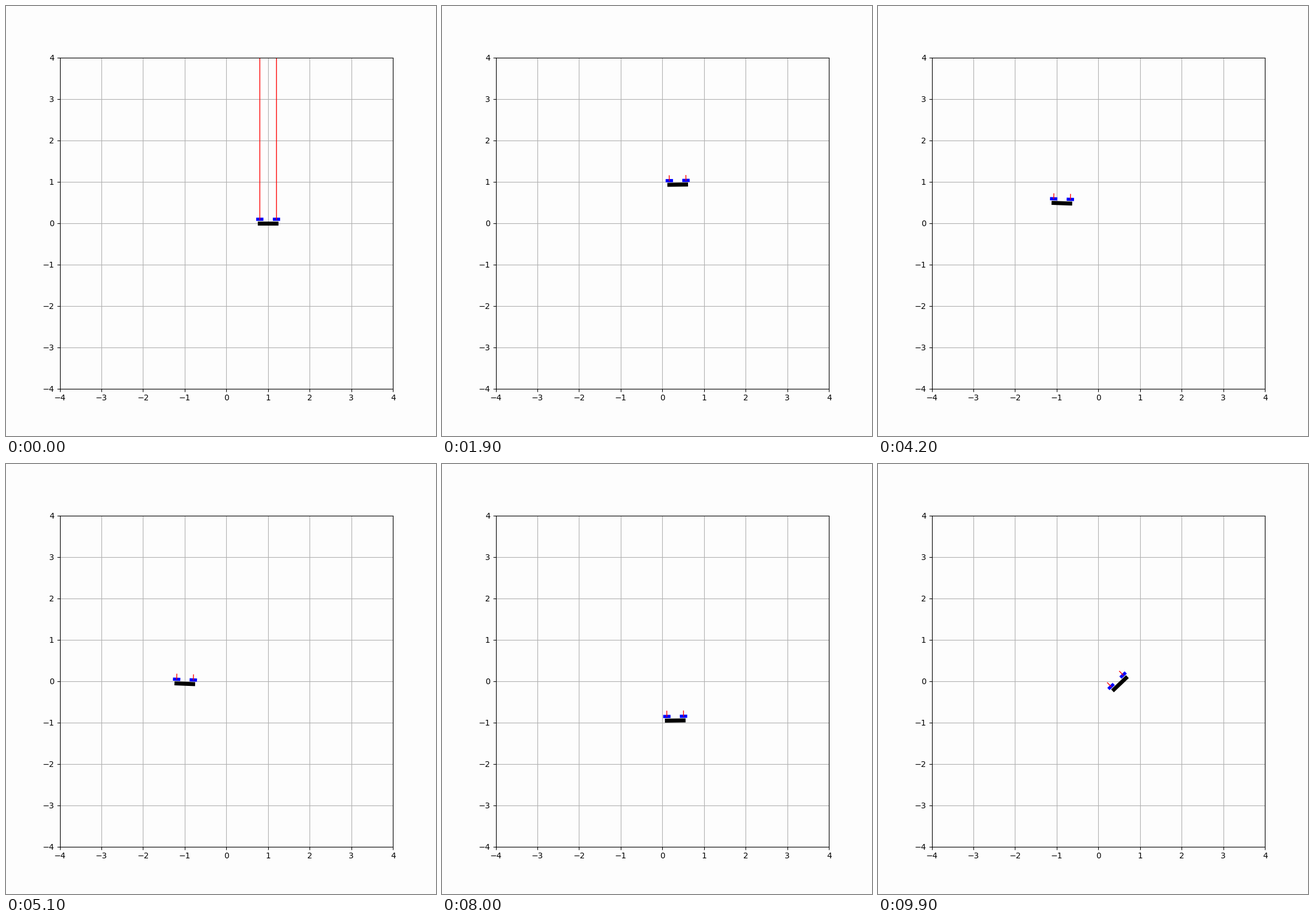
Animation of 748 by 748 pixels, one loop 10 s. Source, as a matplotlib script:

```python
import numpy as np
import matplotlib.pyplot as plt
from matplotlib.animation import FuncAnimation

FRAMES, DT = 100, 0.1
G = 9.81
OMEGA = 2 * np.pi / (FRAMES * DT)
ARM, LIFT, BLADE = 0.2, 0.1, 0.05
HOVER, KICK = 0.125, 5.0
SWERVE_AT, SWERVE_TIME, SWERVE = 9.1, 0.8, 0.48

fig, ax = plt.subplots(figsize=(7.48, 7.48), dpi=100, facecolor="#fdfdfd")
ax.set_facecolor("#fdfdfd")
ax.set(xlim=(-4, 4), ylim=(-4, 4))
ax.grid(True)

body, = ax.plot([], [], color="black", lw=5)
rotors = [ax.plot([], [], color="blue", lw=4)[0] for _ in range(2)]
thrusts = [ax.plot([], [], color="red", lw=1)[0] for _ in range(2)]


def state(t):
    """Position, tilt and thrust length of the drone at time t."""
    a = OMEGA * t
    x, y = np.cos(a), np.sin(a)
    ax_, ay_ = -OMEGA**2 * x, -OMEGA**2 * y
    s = max(0.0, t - SWERVE_AT) / SWERVE_TIME
    x -= SWERVE * s**4
    ax_ -= 12 * SWERVE * s**2 / SWERVE_TIME**2
    thrust = HOVER * (1 + ay_ / G) if t > 0 else KICK
    return np.array([x, y]), np.arctan2(-ax_, G) if t > 0 else 0.0, thrust


def update(i):
    pos, tilt, thrust = state(i * DT)
    along = np.array([np.cos(tilt), np.sin(tilt)])
    up = np.array([-np.sin(tilt), np.cos(tilt)])

    def segment(line, p, q):
        line.set_data([p[0], q[0]], [p[1], q[1]])

    segment(body, pos - ARM * along, pos + ARM * along)
    for side, rotor, jet in zip((-1, 1), rotors, thrusts):
        hub = pos + side * ARM * along + LIFT * up
        segment(rotor, hub - BLADE * along, hub + BLADE * along)
        segment(jet, hub, hub + thrust * up)
    return [body, *rotors, *thrusts]


anim = FuncAnimation(fig, update, frames=FRAMES, interval=1000 * DT,
                     repeat=True, repeat_delay=0)
plt.show()
```
